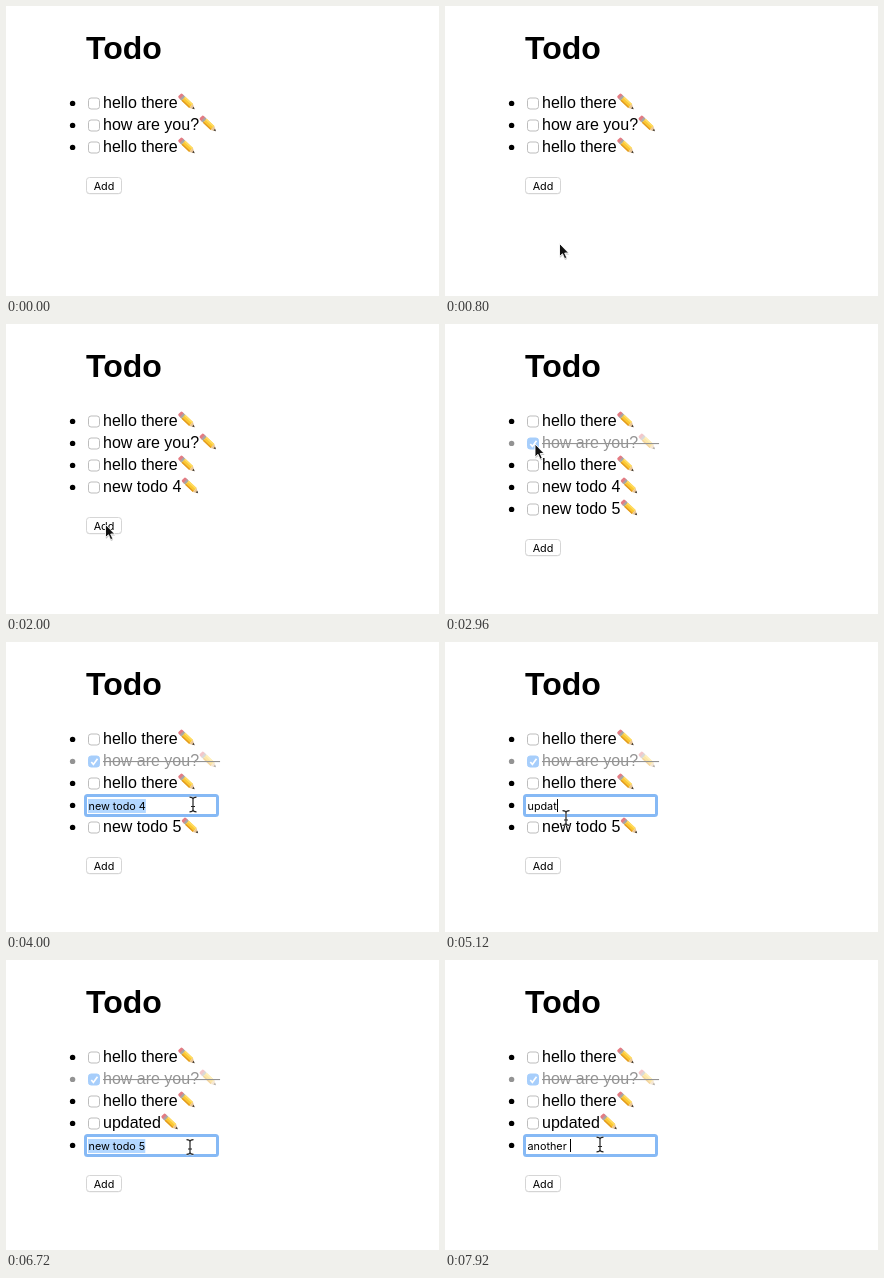
Write an HTML page that moves like this. It is 433 px wide and 290 px high and loops after 8000 ms.

```html
<!DOCTYPE html>
<html lang="en">
<head>
<meta charset="utf-8">
<title>Todo</title>
<style>
  html, body { margin: 0; width: 100%; height: 100%; overflow: hidden; background: #fff; }
  svg { display: block; width: 433px; height: 290px; }
  text { font-family: "Liberation Sans", Arial, sans-serif; font-size: 16px; white-space: pre; }
  .title { font-size: 32px; font-weight: bold; }
  .control { font-family: Inter, Roboto, sans-serif; font-size: 10.8px; }
</style>
</head>
<body>
<svg id="stage" viewBox="0 0 433 290" xmlns="http://www.w3.org/2000/svg">
  <defs>
    <g id="pencil">
      <g transform="rotate(43.5)">
        <rect x="0" y="-2.7" width="4.5" height="5.4" rx="1.5" fill="#e47b83"/>
        <rect x="3" y="-2.7" width="2.6" height="5.4" fill="#a9a6a3"/>
        <rect x="5.4" y="-2.7" width="10.6" height="5.4" fill="#fbc832"/>
        <path d="M5.4 -2.7H16V-1.1H5.4Z" fill="#ffdc62"/>
        <path d="M5.4 1.3H16V2.7H5.4Z" fill="#e29a22"/>
        <path d="M16 -2.7L20.6 0L16 2.7Z" fill="#e9c595"/>
        <path d="M18.5 -1.2L20.8 0L18.5 1.2Z" fill="#3c3936"/>
      </g>
    </g>
    <g id="arrow">
      <path d="M0 0V13L3 10.3L5.1 15.2L7.3 14.2L5.2 9.5H9.2Z" fill="#000" opacity=".22" transform="translate(.4 1.4)"/>
      <path d="M0 0V13L3 10.3L5.1 15.2L7.3 14.2L5.2 9.5H9.2Z" fill="#111" stroke="#fff" stroke-width=".9"/>
    </g>
    <g id="hand" stroke="#111" stroke-linecap="round" stroke-linejoin="round">
      <path d="M-1.6 1.2C-1.6 -.8 1.4 -.8 1.4 1.2V6C2 4.8 4.2 5 4.3 6.4C5 5.4 7 5.8 7.1 7.2C8 6.5 9.4 7 9.4 8.5V11C9.4 13 8 14 8 17H.5C0 14 -3 12 -4.6 9.4C-5.6 7.6 -3.4 6.8 -2.4 8.4L-1.6 9.4Z" fill="#fff" stroke-width="1.2"/>
      <path d="M1.4 6V8.5M4.3 6.5V8.7M7.1 7.2V9M2 11.5V14.5M4.2 11.5V14.5M6.3 11.5V14.5" fill="none" stroke-width=".9"/>
    </g>
    <path id="beamPath" d="M-3.5 -7.3Q0 -7.3 0 -5Q0 -7.3 3.5 -7.3M0 -5V5M-3.5 7.3Q0 7.3 0 5Q0 7.3 3.5 7.3M-2 2H2"/>
    <g id="beam" fill="none">
      <use href="#beamPath" stroke="#fff" stroke-width="2.2" opacity=".7"/>
      <use href="#beamPath" stroke="#222" stroke-width="1.2"/>
    </g>
  </defs>
  <rect width="433" height="290" fill="#fff"/>
  <text class="title" x="80" y="53">Todo</text>
  <g id="list"></g>
  <g id="button">
    <rect x="80.5" y="172" width="35" height="16.3" rx="3.2" fill="#000" opacity=".14"/>
    <rect x="80.5" y="171.5" width="35" height="16" rx="3" fill="#fff" stroke="#d2d2d2" stroke-width=".9"/>
    <text class="control" x="98" y="184" text-anchor="middle">Add</text>
  </g>
  <use id="cursor"/>
</svg>
<script>
const LOOP = 8000, STEP = 80, ROW = 22;
const $ = id => document.getElementById(id);

function add(parent, tag, attrs = {}) {
  const node = document.createElementNS('http://www.w3.org/2000/svg', tag);
  for (const key in attrs) node.setAttribute(key, attrs[key]);
  parent.appendChild(node);
  return node;
}
function set(node, attrs) {
  for (const key in attrs) node.setAttribute(key, attrs[key]);
}
const show = (node, on) => node.setAttribute('display', on ? 'inline' : 'none');

const items = [
  { text: 'hello there', from: 0 },
  { text: 'how are you?', from: 0, doneAt: 2880 },
  { text: 'hello there', from: 0 },
  { text: 'new todo 4', from: 1520, renamed: 'updated',
    edit: { from: 3840, to: 5600, typed: 'updated', keys: [4800, 4880, 4960, 5040, 5120, 5200, 5360] } },
  { text: 'new todo 5', from: 2240,
    edit: { from: 6560, to: LOOP, typed: 'another ', keys: [7440, 7520, 7520, 7680, 7760, 7840, 7920, 7920] } }
];

// [start, end, x, y, shape]: the pointer eases to x,y between start and end
const moves = [
  [480, 800, 114.5, 237.5, 'arrow'],
  [960, 1280, 99.5, 178, 'arrow'],
  [1520, 2000, 99.5, 200.5, 'arrow'],
  [2240, 2800, 90, 120, 'arrow'],
  [3200, 3680, 187.5, 161, 'hand'],
  [3840, 3920, 187, 162.5, 'beam'],
  [4080, 4320, 121, 176, 'beam'],
  [6080, 6160, 169.5, 169.8, 'hand'],
  [6160, 6480, 184, 186, 'hand'],
  [6560, 6640, 184, 187, 'beam'],
  [6800, 7040, 155, 184.5, 'beam']
];

function buildRow(item, index) {
  const row = add($('list'), 'g', { transform: `translate(0 ${index * ROW})` });
  add(row, 'circle', { cx: 66.6, cy: 97.4, r: 2.7 });

  const view = add(row, 'g');
  const box = add(view, 'rect', { x: 82.5, y: 92, width: 11, height: 11, rx: 2.6, 'stroke-width': 1 });
  const tick = add(view, 'path', { d: 'M85.3 98L87.4 100.4L91.5 94.7', fill: 'none', stroke: '#fff', 'stroke-width': 1.7 });
  const label = add(view, 'text', { x: 97, y: 102 });
  const pencil = add(view, 'use', { href: '#pencil' });
  const strike = add(view, 'rect', { x: 97, y: 97, height: 1.1 });

  const field = add(row, 'g');
  const ring = add(field, 'rect', { x: 79.5, y: 87.5, width: 132, height: 20, rx: 2, fill: '#fff', stroke: '#86b9f5', 'stroke-width': 3 });
  add(field, 'rect', { x: 81, y: 89, width: 129, height: 17, fill: '#fff' });
  const selection = add(field, 'rect', { x: 82, y: 91, height: 14, fill: '#b3d7ff' });
  const value = add(field, 'text', { class: 'control', x: 82.5, y: 102, 'xml:space': 'preserve' });
  const caret = add(field, 'rect', { y: 91, width: 1, height: 13 });
  return { row, view, box, tick, label, pencil, strike, field, ring, selection, value, caret };
}
const rows = items.map(buildRow);

function drawRow(item, ui, t) {
  const { edit } = item;
  const editing = !!edit && t >= edit.from && t < edit.to;
  const done = item.doneAt !== undefined && t >= item.doneAt;
  show(ui.row, t >= item.from);
  show(ui.view, !editing);
  show(ui.field, editing);
  if (t < item.from) return;

  if (editing) {
    const count = edit.keys.filter(key => key <= t).length;
    const fresh = count === 0;
    ui.value.textContent = fresh ? item.text : edit.typed.slice(0, count);
    const width = ui.value.getComputedTextLength();
    set(ui.ring, { 'stroke-opacity': Math.min(1, .4 + (t - edit.from) / 260) });
    set(ui.selection, { width: width + .5 });
    set(ui.caret, { x: Math.round(82.5 + width + .4) });
    show(ui.selection, fresh);
    show(ui.caret, !fresh);
    return;
  }
  ui.label.textContent = item.renamed && t >= edit.to ? item.renamed : item.text;
  const width = ui.label.getComputedTextLength();
  set(ui.row, { opacity: done ? .42 : 1 });
  set(ui.box, { fill: done ? '#2f8cf7' : '#fff', stroke: done ? '#2f8cf7' : '#bdbdbd' });
  set(ui.pencil, { transform: `translate(${97 + width + 1.8} 89)` });
  set(ui.strike, { width: width + 21 });
  show(ui.tick, done);
  show(ui.strike, done);
}

function pointerAt(t) {
  let x = 122, y = 306, shape = 'arrow';
  for (const [start, end, toX, toY, toShape] of moves) {
    if (t <= start) break;
    const p = Math.min(1, (t - start) / (end - start));
    const eased = p * p * (3 - 2 * p);
    x += (toX - x) * eased;
    y += (toY - y) * eased;
    if (p > .7) shape = toShape;
  }
  return { x, y, shape };
}

function draw(time) {
  const t = Math.floor(time % LOOP / STEP) * STEP;
  items.forEach((item, i) => drawRow(item, rows[i], t));
  const count = items.filter(item => t >= item.from).length;
  set($('button'), { transform: `translate(0 ${(count - 3) * ROW})` });
  const { x, y, shape } = pointerAt(t);
  set($('cursor'), { href: '#' + shape, transform: `translate(${x} ${y})` });
}

const origin = performance.now();
function tick() {
  draw(performance.now() - origin);
  requestAnimationFrame(tick);
}
tick();
</script>
</body>
</html>
```
